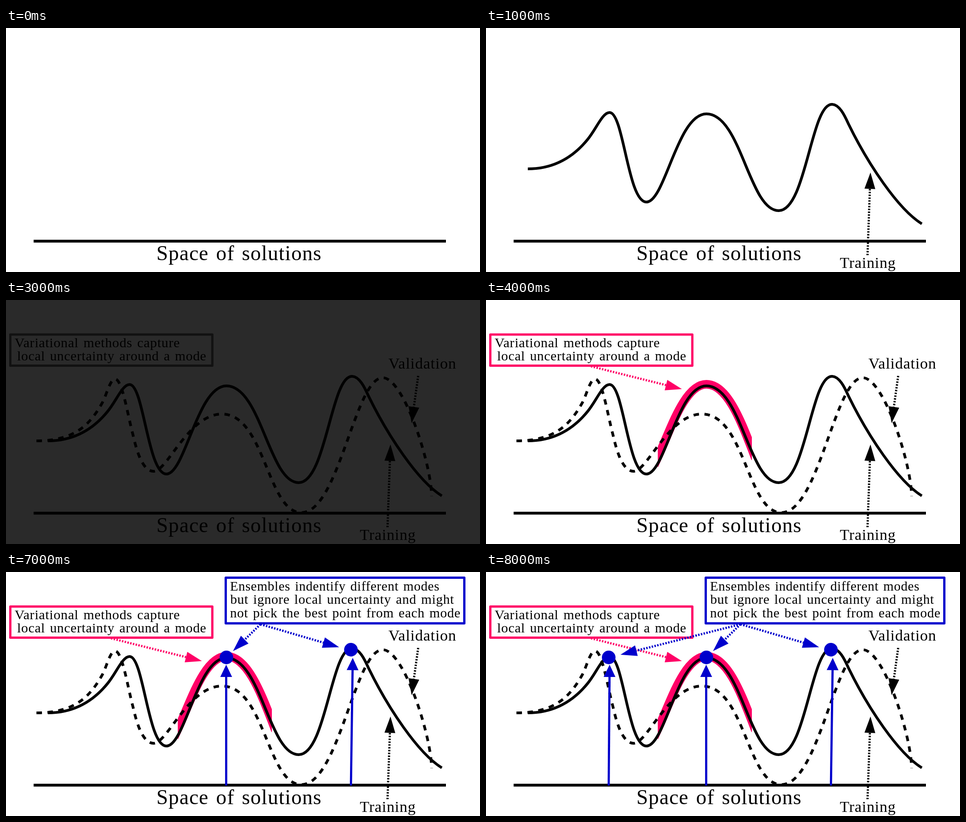
Recreate the animation shown at these times as an HTML page. Size 1043 by 537 pixels, loop 10000 ms.

```html
<!DOCTYPE html>
<html lang="en">
<head>
<meta charset="utf-8">
<title>Space of solutions</title>
<style>
  html, body { margin: 0; width: 100%; height: 100%; overflow: hidden; background: #fff; }
  svg { display: block; width: 1043px; height: 537px; }
  text {
    font-family: "Liberation Serif", "Times New Roman", serif;
    letter-spacing: .025em;
    word-spacing: .08em;
  }
</style>
</head>
<body>
<svg id="stage" viewBox="0 0 1043 537" xmlns="http://www.w3.org/2000/svg"></svg>
<script>
const NS = 'http://www.w3.org/2000/svg';
const LOOP = 10000;
const BLACK = '#000', PINK = '#ff0066', BLUE = '#0000cc';
const stage = document.getElementById('stage');
const layers = [];

function add(parent, tag, attrs, content) {
  const el = document.createElementNS(NS, tag);
  for (const key in attrs) el.setAttribute(key, attrs[key]);
  if (content) el.textContent = content;
  parent.appendChild(el);
  return el;
}

// A group visible from one time in the loop until another
function layer(from, to = LOOP) {
  const el = add(stage, 'g', {});
  layers.push({ el, from, to });
  return el;
}

function line(g, d, color, width, dash = 'none') {
  return add(g, 'path', {
    d, fill: 'none', stroke: color, 'stroke-width': width, 'stroke-dasharray': dash
  });
}

// Equal dashes and gaps; a last dash just begins at the end of the path
function dashed(path, size) {
  const len = path.getTotalLength() - 1.3;
  const pairs = Math.round(len / (2 * size));
  path.setAttribute('stroke-dasharray', len / pairs / 2);
}

function label(g, x, y, size, str) {
  add(g, 'text', { x, y, 'font-size': size, fill: BLACK }, str);
}

function frame(g, x, y, w, h, color) {
  add(g, 'rect', {
    x, y, width: w, height: h, fill: 'none', stroke: color,
    'stroke-width': 5, 'stroke-linejoin': 'round'
  });
}

function arrow(g, x0, y0, x1, y1, color, { len = 36, half = 11.9, dash = '3.2 3' } = {}) {
  const dist = Math.hypot(x1 - x0, y1 - y0);
  const ux = (x1 - x0) / dist, uy = (y1 - y0) / dist;
  const bx = x1 - ux * len, by = y1 - uy * len;
  line(g, `M${x0},${y0} L${bx},${by}`, color, 4.8, dash);
  add(g, 'path', {
    d: `M${x1},${y1} L${bx - uy * half},${by + ux * half} L${bx + uy * half},${by - ux * half} Z`,
    fill: color
  });
}

// One ensemble member: pointer from the box, stem from the axis, dot on the peak
function member(time, tip, stem, dot) {
  const g = layer(time);
  arrow(g, 560, 115, ...tip, BLUE);
  arrow(g, ...stem, BLUE, { len: 27, half: 13, dash: 'none' });
  add(g, 'circle', { cx: dot[0], cy: dot[1], r: 15, fill: BLUE });
}

const flash = layer(3000, 4000);
add(flash, 'rect', { width: 1043, height: 537, fill: '#2a2a2a' });
frame(flash, 9.5, 76, 444.5, 68.5, '#111');

const mode = layer(4000);
const clip = add(add(stage, 'defs', {}), 'clipPath', { id: 'near' });
add(clip, 'rect', { x: 378, y: 150, width: 207, height: 260 });
line(mode,
  'M370,364 L378,346 C406,286 437,185.5 485,185.5 C530,185.5 560,264 585,328 L593,349',
  PINK, 19).setAttribute('clip-path', 'url(#near)');
arrow(mode, 231, 146, 431, 196, PINK);
frame(mode, 9.5, 76, 444.5, 68.5, PINK);

const training = layer(1000);
line(training,
  'M92,310 C142,310 187,290 223,246 C243,222 256,186 272,186 ' +
  'C303,186 312,383 353,383 C394,383 421,189 485,189 ' +
  'C561,189 579,402 644,402 C704,402 715,168 761,168 ' +
  'C779,168 791,197 798,212 C840,298 906,398 959,431', BLACK, 6);
label(training, 778.5, 528, 34.2, 'Training');

const validation = layer(2000);
dashed(line(validation,
  'M67,310 C150,310 184,276 212,226 C222,207 229,174 240,174 ' +
  'C256,174 268,255 279,295 C288,335 301,377 325,377 ' +
  'C355,377 402,251 475,251 C570,251 575,468 650,468 ' +
  'C732,468 768,171 829,171 C875,171 936,360 936.5,432', BLACK, 6), 12);
arrow(validation, 907, 167, 892.5, 271, BLACK);
label(validation, 841.5, 151, 34.3, 'Validation');

const axis = layer(0);
line(axis, 'M60.8,469.1 H968', BLACK, 6.2);
label(axis, 331, 511, 45.8, 'Space of solutions');

arrow(layer(1000), 839.5, 500, 846, 318, BLACK);

const local = layer(3000);
label(local, 19, 104, 30.2, 'Variational methods capture');
label(local, 24.5, 133, 29.8, 'local uncertainty around a mode');

const ensembles = layer(5000);
frame(ensembles, 483.5, 12.5, 525, 100.5, BLUE);
label(ensembles, 493, 41, 29.1, 'Ensembles indentify different modes');
label(ensembles, 493.5, 70, 29.6, 'but ignore local uncertainty and might');
label(ensembles, 493, 100, 29.6, 'not pick the best point from each mode');

member(6000, [499.5, 174], [484.5, 470, 484.5, 204], [485, 188]);
member(7000, [733, 165.5], [759, 470, 763, 189], [759, 171]);
member(8000, [296, 182], [270, 470, 272, 204], [270, 188]);

const start = performance.now();
function draw(now) {
  const t = Math.max(0, now - start) % LOOP;
  for (const { el, from, to } of layers) {
    el.setAttribute('visibility', t >= from && t < to ? 'visible' : 'hidden');
  }
  requestAnimationFrame(draw);
}
draw(start);
</script>
</body>
</html>
```
